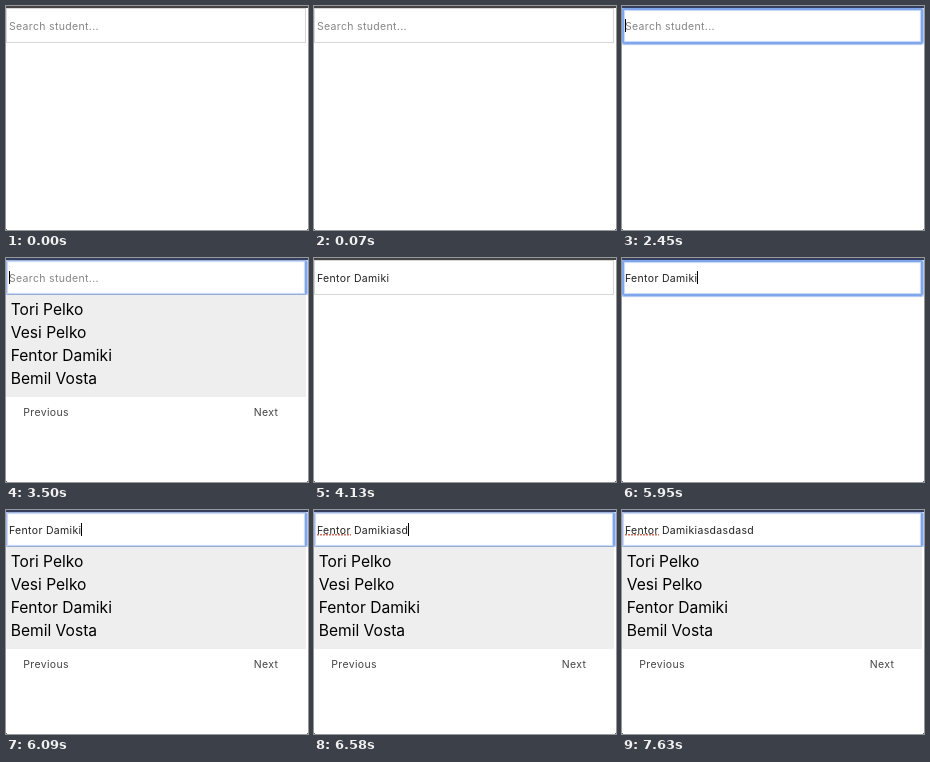
These frames come from a looping animation (302x224 px, 8000 ms). An HTML page:

```html
<!DOCTYPE html>
<html lang="en">
<head>
<meta charset="utf-8">
<title>Student search</title>
<style>
  html, body { margin: 0; width: 100%; height: 100%; overflow: hidden; background: #fff; }
  body { font: 10.5px/14px Inter, Roboto, sans-serif; letter-spacing: .33px; color: #444; }
  #stage { position: relative; width: 302px; height: 224px; overflow: hidden; background: #fff; }
  #stage div, #hint, #value { position: absolute; box-sizing: border-box; white-space: pre; }

  .bar { left: 0; top: 0; width: 302px; height: 2px; background: #444; }
  .field { left: 0; top: 2px; width: 300px; height: 35px; border: 1px solid #d6d6d6; }
  .ring { left: 0; top: 2px; width: 301px; height: 36px; border: 2px solid #80a6ea;
    border-radius: 2px; box-shadow: 0 0 1px 1px #a9c3f2, inset 0 0 1px 1px #c3d6f7; }
  .open .ring { height: 35px; border-width: 1px 2px 1px 1px; border-color: #9fb2dc #80a6ea #98a9d2 #a9b9de; }
  .focus .bar { background: #343f60; }
  .ring, .menu { visibility: hidden; }
  .focus .ring, .open .menu { visibility: visible; }

  .line { left: 3px; top: 13px; height: 14px; }
  #hint { left: 0; top: 1px; color: #858585; }
  #value { left: 0; top: 1px; color: #222; }
  #value i { font-style: normal; }
  .typo #value i { background: repeating-linear-gradient(90deg, #d0705f 0 2px, transparent 2px 3px) 0 86% / 100% 1.5px no-repeat; }
  #caret { position: relative; top: -1px; display: inline-block; width: 1px; height: 13px; margin-right: -1px;
    vertical-align: top; background: #000; }

  .menu { left: 0; top: 37px; width: 302px; height: 187px; background: #fff; }
  .list { left: 0; top: 0; width: 300px; height: 102px; padding: 3px 0 0 4.7px; background: #eee;
    font-size: 15.6px; line-height: 23px; letter-spacing: 0; color: #000; }
  .prev { left: 17.3px; top: 111px; }
  .next { left: 247.7px; top: 111px; }
  .corner { top: 223px; width: 1px; height: 1px; background: #666; }
</style>
</head>
<body>
<div id="stage">
  <div class="field"></div>
  <div class="ring"></div>
  <div class="bar"></div>
  <div class="line"><span id="hint">Search student...</span><span id="value"><i id="first"></i><span id="rest"></span><span id="caret"></span></span></div>
  <div class="menu">
    <div class="list">Tori Pelko
Vesi Pelko
Fentor Damiki
Bemil Vosta</div>
    <div class="prev">Previous</div>
    <div class="next">Next</div>
  </div>
  <div class="corner" style="left:0"></div>
  <div class="corner" style="left:301px"></div>
</div>
<script>
  const LOOP = 8000;
  const $ = id => document.getElementById(id);
  const within = (t, ...spans) => spans.some(([from, to]) => t >= from && t < to);

  // [time, letters typed after the picked name]
  const keys = [[6370, 1], [6440, 2], [6580, 3], [6720, 5], [6860, 6], [7000, 8], [7070, 9]];

  function draw(t) {
    const picked = t >= 4130;
    const typed = keys.reduce((n, [at, count]) => t >= at ? count : n, 0);

    const cls = $('stage').classList;
    cls.toggle('focus', within(t, [2450, 4130], [5950, LOOP]));
    cls.toggle('open', within(t, [2590, 4130], [6090, LOOP]));
    cls.toggle('typo', typed > 0);

    $('hint').style.visibility = picked ? 'hidden' : 'visible';
    $('first').textContent = picked ? 'Fentor' : '';
    $('rest').textContent = picked ? ' Damiki' + 'asd'.repeat(3).slice(0, typed) : '';
    const blink = within(t, [2450, 2940], [3500, 3990], [5950, 7630]);
    $('caret').style.visibility = blink ? 'visible' : 'hidden';
  }

  let start;
  function tick(now) {
    start ??= now;
    draw((now - start) % LOOP);
    requestAnimationFrame(tick);
  }
  draw(0);
  requestAnimationFrame(tick);
</script>
</body>
</html>
```
